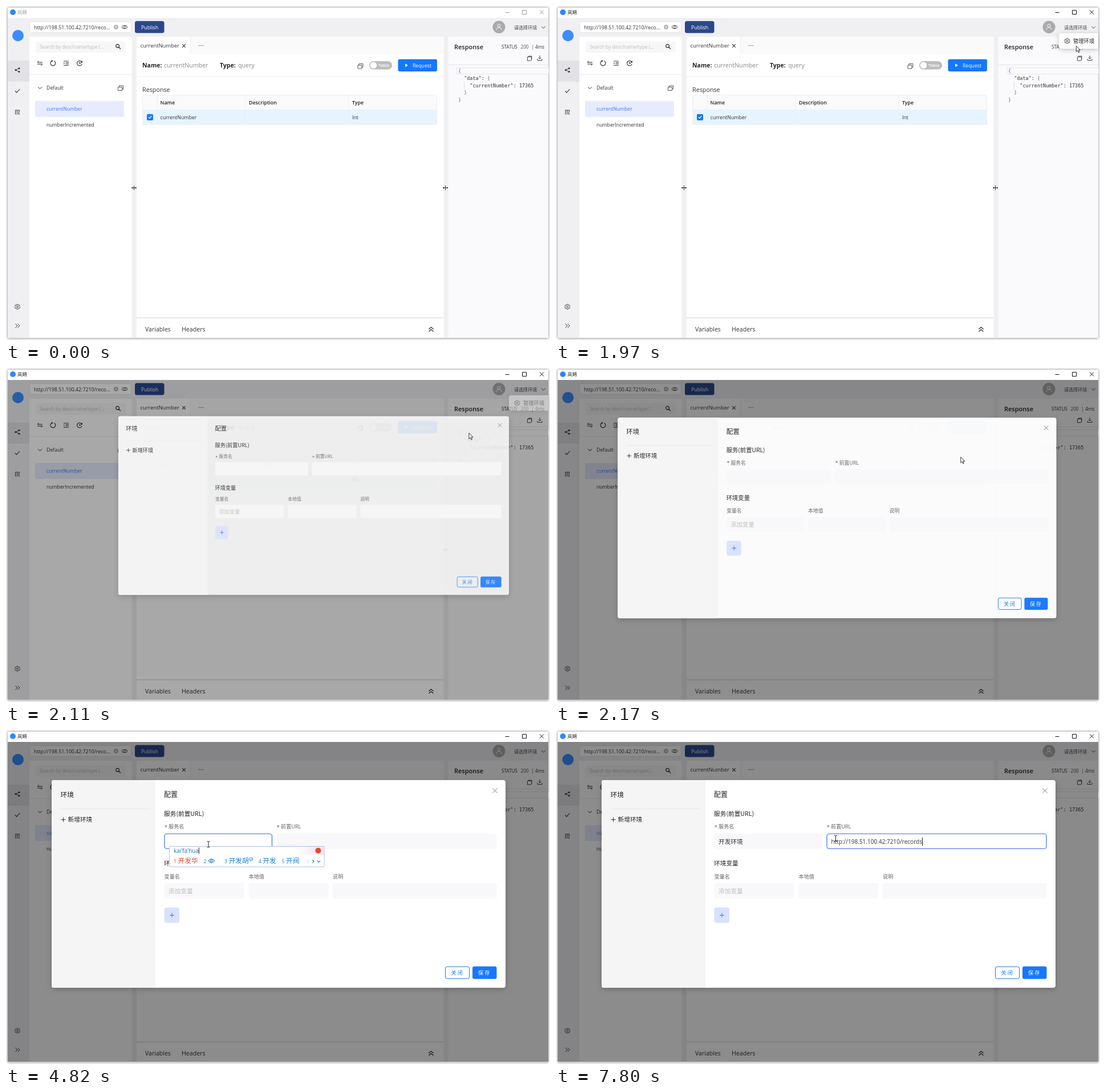
Write an HTML page with a canvas that moves like this. It is 954x587 px and loops after 8000 ms.

```html
<!DOCTYPE html>
<html lang="zh">
<head>
<meta charset="utf-8">
<title>API client</title>
<style>
html, body { margin: 0; width: 100%; height: 100%; overflow: hidden; background: #fff; }
canvas { display: block; width: 954px; height: 587px; }
</style>
</head>
<body>
<canvas id="stage"></canvas>
<script>
const W = 954, H = 587, LOOP = 8000, STEP = 68.4;
const canvas = document.getElementById('stage');
const ctx = canvas.getContext('2d');
const dpr = window.devicePixelRatio || 1;
canvas.width = W * dpr;
canvas.height = H * dpr;

const SANS = '"Open Sans", "Noto Sans CJK SC", sans-serif';
const HAN = '"Noto Sans CJK SC", "Noto Sans CJK JP", "Noto Sans CJK", sans-serif';
const MONO = '"DejaVu Sans Mono", monospace';
const BLUE = '#1677ff', INK = '#333', BAR = '#f0f0f3';
const ADDRESS = 'http://198.51.100.42:7210/records';

// ---------- helpers ----------
function text(s, x, y, size, color = INK, weight = 400, family = SANS) {
  ctx.font = `${weight} ${size}px ${family}`;
  ctx.fillStyle = color;
  ctx.fillText(s, x, y);
  return ctx.measureText(s).width;
}
// Chinese text, placed by its vertical centre
const han = (s, x, cy, size, color = INK, weight = 400) =>
  text(s, x, cy + size * 0.37, size, color, weight, HAN);

function rect(x, y, w, h, color, r = 0) {
  ctx.fillStyle = color;
  ctx.beginPath();
  ctx.roundRect(x, y, w, h, r);
  ctx.fill();
}
function frame(x, y, w, h, color, r = 0, line = 1) {
  ctx.strokeStyle = color;
  ctx.lineWidth = line;
  ctx.beginPath();
  ctx.roundRect(x + 0.5, y + 0.5, w - 1, h - 1, r);
  ctx.stroke();
}
function disc(x, y, r, color) {
  ctx.fillStyle = color;
  ctx.beginPath();
  ctx.arc(x, y, r, 0, 7);
  ctx.fill();
}
function icon(x, y, d, color = INK, line = 1, fill) {
  ctx.save();
  ctx.translate(x, y);
  const p = new Path2D(d);
  if (fill) { ctx.fillStyle = fill; ctx.fill(p); }
  ctx.strokeStyle = color;
  ctx.lineWidth = line;
  ctx.stroke(p);
  ctx.restore();
}
const ring = r => `M${r} 0A${r} ${r} 0 1 1 ${-r} 0A${r} ${r} 0 1 1 ${r} 0`;
function shadow(color, blur, dy = 0) {
  ctx.shadowColor = color;
  ctx.shadowBlur = blur * dpr;
  ctx.shadowOffsetY = dy * dpr;
}
const noShadow = () => shadow('transparent', 0);

// Values at time t from rows of [time, ...values]
function along(keys, t) {
  if (t <= keys[0][0]) return keys[0].slice(1);
  for (let i = 1; i < keys.length; i++) {
    const a = keys[i - 1], b = keys[i];
    if (t < b[0]) {
      const p = (t - a[0]) / (b[0] - a[0]);
      return a.slice(1).map((v, j) => v + (b[j + 1] - v) * p);
    }
  }
  return keys[keys.length - 1].slice(1);
}

const CROSS = 'M-3.5-3.5L3.5 3.5M3.5-3.5L-3.5 3.5';
const COPY = 'M-4.5-1.5H2.5V4.5H-4.5ZM-2.5-1.5V-4H4.5V2H2.5';
const GEAR = ring(1.5) + 'M-1.2-4.2H1.2L1.8-2.9L3.6-2.9L4.4-.9L3.5 0L4.4.9L3.6 2.9L1.8 2.9L1.2 4.2H-1.2L-1.8 2.9L-3.6 2.9L-4.4.9L-3.5 0L-4.4-.9L-3.6-2.9L-1.8-2.9Z';
const PLUS = 'M-4 0H4M0-4V4';
const DOWN = 'M-3.3-1.7L0 1.7L3.3-1.7';

// ---------- main window ----------
function titleBar(active) {
  const c = active ? '#111' : '#999';
  rect(3, 3, 948, 18, '#fff');
  disc(12, 11, 5, '#2f86ff');
  han('岚朔', 20, 11, 8.3, c);
  icon(879, 11, 'M-3.5.5H3.5', c);
  icon(909, 11, 'M-3.5-3.5H3.5V3.5H-3.5Z', c);
  icon(939.5, 11, CROSS, c);
}

function topBar() {
  rect(41, 27, 179, 20, '#fff', 4);
  frame(41, 27, 179, 20, '#e2e2e6', 4);
  text(ADDRESS.slice(0, 30) + '...', 49, 40.5, 8.8);
  disc(193, 37, 4, '#b5b5b5');
  icon(193, 37, 'M-1.5-1.5L1.5 1.5M1.5-1.5L-1.5 1.5', '#fff', 0.9);
  icon(208, 37, 'M1.5 2.5H-2.2A2.5 2.5 0 0 1-2.2-2.5H1A2.5 2.5 0 0 1 1 1.5H-1.5M-1.5-2.5H2.2A2.5 2.5 0 0 1 2.2 2.5H-1A2.5 2.5 0 0 1-1-1.5H1.5', '#444', 0.8);
  rect(226, 26.5, 51.5, 21, '#2b478b', 3.5);
  text('Publish', 237, 40.5, 8.8, '#fff');
  disc(864.5, 37, 11, '#aaa');
  icon(864.5, 37, 'M2.6-2.4A2.6 2.6 0 1 1-2.6-2.4A2.6 2.6 0 1 1 2.6-2.4M-4.8 5.2C-4.5-.8 4.5-.8 4.8 5.2', '#fff');
  han('请选择环境', 891, 38, 8.05, '#444');
  icon(942.5, 37.5, DOWN, '#444');
}

function rail() {
  rect(3, 96, 38, 37, '#e1e1e6');
  disc(21, 52, 10, '#3b8cff');
  icon(20, 112.5, 'M3-3L-3 0L3 3', INK, 0.9);
  [[-3, 0], [3, -3], [3, 3]].forEach(([x, y]) => disc(20 + x, 112.5 + y, 1.5, INK));
  icon(20, 149, 'M-4 .5L-1.3 3.2L4.2-3', INK, 1.1);
  icon(20, 186.5, 'M-1 3.5H-3.5V-3.5H3.5V0M-2-1.5H2M-2 .5H-.5M3 2A1.5 1.5 0 1 1 0 2A1.5 1.5 0 1 1 3 2M2.6 3L4 4.4', INK, 0.9);
  icon(20, 528.5, GEAR, INK, 0.9);
  icon(20, 562, 'M-3.5-3.5L0 0L-3.5 3.5M.5-3.5L4 0L.5 3.5', INK);
}

function sidePanel() {
  rect(41, 54, 179.5, 529, '#fff');
  rect(52, 62, 158, 20, '#f7f7f8', 3);
  text('Search by desc/name/type (...', 59, 75, 8.25, '#bdbdbd');
  icon(196.5, 71, 'M2 -.8A2.9 2.9 0 1 1-3.8-.8A2.9 2.9 0 1 1 2-.8M1.3 1.4L4.5 4.5', '#222', 1.2);
  icon(59.5, 100.5, 'M4.5-1.5H-4.5L-1.8-4M-4.5 1.5H4.5L1.8 4', '#222');
  icon(82.5, 100.5, 'M-1.2-4.3A4.4 4.4 0 1 0 1.8-4M-2.8-5L-1-4.2L-2-2.5', '#222', 1.1);
  icon(105.5, 100.5, 'M-4.5-3.5H4.5M-1-1H4.5M-1 1.3H4.5M-4.5 3.8H4.5M-4.5-1.2L-2.8.2L-4.5 1.6', '#222', 0.9);
  icon(129, 100.5, 'M3.8-2.2A4.4 4.4 0 1 0 4.2 1.6M0-2.5V.5H2.5M4.4-4V-1.6H2', '#222', 1.1);
  rect(41, 120, 179.5, 1, '#ececee');
  icon(59.5, 144, DOWN, '#222');
  text('Default', 71, 147, 8.8);
  icon(201, 144, COPY, '#444', 0.9);
  rect(51, 167, 156, 28, '#e6ebfe', 2);
  text('currentNumber', 71, 184, 8.6, '#3d78f2');
  text('numberIncremented', 71, 212, 8.65);
}

function centre() {
  rect(229, 54, 538.5, 529, '#fff');
  rect(229, 54, 538.5, 30.5, '#fafafb');
  rect(229, 54, 94, 31, '#fff');
  rect(323, 54, 1, 30, '#eeeef0');
  text('currentNumber', 235.5, 73, 9.4);
  icon(312, 70, 'M-2.8-2.8L2.8 2.8M2.8-2.8L-2.8 2.8', '#333', 1.1);
  [338.5, 342, 345.5].forEach(x => disc(x, 69.5, 0.8, '#555'));

  text('Name:', 239, 108, 10.5, '#222', 700);
  text('currentNumber', 277, 108, 10.65, '#888');
  text('Type:', 375, 108, 10.5, '#222', 700);
  text('query', 407, 108, 10.7, '#888');
  icon(621.5, 105.5, COPY, '#444', 0.9);
  rect(637, 97, 40, 14.5, '#bcbcbc', 7.2);
  disc(644.5, 104.2, 5.8, '#fff');
  text('Table', 653, 107, 7.6, '#fff', 600);
  rect(687.5, 93.5, 68.5, 21.5, BLUE, 3);
  icon(701, 104.2, 'M-.8-3L4-0L-.8 3Z', 'transparent', 0, '#fff');
  text('Request', 713, 107.5, 8.7, '#fff');
  rect(229, 123, 538, 1, '#f0f0f0');

  text('Response', 239, 150.5, 10.75);
  rect(239, 156.5, 517, 26, '#fafafa', [4, 4, 0, 0]);
  rect(239, 182, 517, 26.5, '#e6f4ff');
  frame(239, 156, 517, 53, '#efeff0', 3);
  [265, 419, 600].forEach(x => rect(x, 157, 1, 25, '#efeff0'));
  [265, 419, 600].forEach(x => rect(x, 182, 1, 26, '#e2f0fb'));
  rect(239, 182, 517, 1, '#eef1f4');
  text('Name', 270.5, 173, 8.8, '#222', 600);
  text('Description', 426, 173, 8.8, '#222', 600);
  text('Type', 607, 173, 8.8, '#222', 600);
  rect(247, 190, 11, 11, BLUE, 2);
  icon(252.5, 195.3, 'M-2.6 0L-.7 2L2.8-2.2', '#fff', 1.3);
  text('currentNumber', 270.5, 199, 8.75);
  text('Int', 607, 199, 8.75);

  rect(229, 547.5, 538, 1, '#cfcfd2');
  text('Variables', 244, 572, 10.55);
  text('Headers', 308, 572, 10.65);
  icon(745.5, 568, 'M-4 0L0-3.5L4 0M-4 4L0 .5L4 4', '#222', 1.1);
}

function responsePanel() {
  rect(775.5, 54, 175.5, 529, '#fafafc');
  text('Response', 786, 76, 11, '#222', 600);
  text('STATUS', 869, 75, 8.1);
  text('200', 902.5, 75, 8.2, '#555');
  text('|', 921, 75, 8.2, '#555');
  text('4ms', 928, 75, 8.1);
  icon(918, 92, 'M-3.5-2.5V4H2.5L3.5 3V-2.5ZM-1.5-2.5V-4H3.8V2', '#333', 0.9);
  icon(936, 91.5, 'M0-4.5V1.5M-2.5-1L0 1.5L2.5-1M-4 1.5V4H4V1.5', '#333', 0.9);
  rect(775.5, 103, 175.5, 1, '#e6e6e9');
  frame(790, 108, 162, 12, '#e6e6ea');
  rect(803, 133, 1, 13, '#ddd');
  const code = (s, col, row, color) => text(s, 793 + col * 5.09, 117.3 + row * 12.6, 8.46, color, 400, MONO);
  code('{', 0, 0, '#2a7fd4');
  code('"data":', 2, 1, '#333');
  code('{', 10, 1, '#777');
  code('"currentNumber": 17365', 4, 2, '#333');
  code('}', 2, 3, '#777');
  code('}', 0, 4, '#2a7fd4');
}

function splitter(x) {
  icon(x, 319.5, 'M-4 0H4M0-4V4M-2.6-1.5L-4 0L-2.6 1.5M2.6-1.5L4 0L2.6 1.5', '#333');
}

function mainWindow(active) {
  rect(0, 0, W, H, '#fff');
  shadow('rgba(0,0,0,.55)', 4);
  rect(3, 3, 948, 580.5, '#fff');
  noShadow();
  rect(3, 21, 948, 562, BAR);
  titleBar(active);
  topBar();
  rail();
  sidePanel();
  centre();
  responsePanel();
  splitter(224.5);
  splitter(770.5);
}

// ---------- pop-ups ----------
function envMenu(alpha) {
  ctx.globalAlpha = alpha;
  shadow('rgba(0,0,0,.22)', 8, 2);
  rect(882, 48, 69, 27, '#fff', [4, 0, 0, 4]);
  noShadow();
  icon(896.5, 61.5, GEAR, '#222', 0.9);
  han('管理环境', 907, 61.5, 9.3, '#222');
  ctx.globalAlpha = 1;
}

const FOCUS_NAME = 2870, COMMIT = 5440, FOCUS_URL = 6870, PASTE = 7800;
const blinkOn = (t, from) => Math.floor((t - from) / 530) % 2 === 0;

function field(x, y, w, focused) {
  rect(x, y, w, 27, focused ? '#fff' : '#f8f8fa', 4);
  if (focused) frame(x, y, w, 27, '#3d6ef0', 4, 1.2);
}
function caret(x) { rect(x, 189, 1, 14.5, '#222'); }

function required(label, x) {
  text('*', x, 174, 8.5, '#555');
  han(label, x + 7, 170, 9.15, '#666');
}

function dialog(t) {
  shadow('rgba(0,0,0,.2)', 10, 3);
  rect(80, 88, 796, 365, '#fff', 4);
  noShadow();
  rect(80, 88, 182, 365, '#f5f5f6', [4, 0, 0, 4]);
  han('环境', 95.5, 113.5, 11.8, '#222', 500);
  rect(96, 138, 157, 1, '#e8e8ea');
  icon(100.5, 157.5, PLUS, '#333');
  han('新增环境', 108.5, 157.5, 10.7, '#222');
  han('配置', 277, 113.5, 12, '#222', 500);
  icon(857.5, 106.5, 'M-4-4L4 4M4-4L-4 4', '#777');

  han('服务(前置URL)', 277, 147, 10.7, '#222', 500);
  required('服务名', 278);
  required('前置URL', 475);
  const onUrl = t >= FOCUS_URL, onName = t >= FOCUS_NAME && !onUrl;
  field(277.5, 182, 189.5, onName);
  field(474.5, 182, 386, onUrl);
  if (t >= COMMIT) han('开发环境', 285, 196, 10.7);
  const pasted = t >= PASTE;
  const urlWidth = pasted ? text(ADDRESS, 482.5, 199.8, 10.05) : 0;
  if (onName && blinkOn(t, t < COMMIT ? FOCUS_NAME : COMMIT)) caret(t < COMMIT ? 285 : 328);
  if (onUrl && blinkOn(t, pasted ? PASTE : FOCUS_URL)) caret(482.5 + urlWidth);

  han('环境变量', 277, 234, 10.7, '#222', 500);
  [['变量名', 277.5, 140], ['本地值', 425.5, 140], ['说明', 573, 287.5]].forEach(([s, x, w]) => {
    han(s, x, 257.5, 9.15, '#666');
    field(x, 269, w);
  });
  han('添加变量', 285, 283, 10.7, '#bfbfbf');
  rect(277.5, 312, 26.5, 27, '#d9e2fd', 4);
  icon(291, 325.5, PLUS, '#3d6ef0');

  frame(770, 415.5, 43, 22, BLUE, 3);
  han('关 闭', 780.5, 426.5, 9.2, BLUE);
  rect(818, 415.5, 42.5, 22, BLUE, 3);
  han('保 存', 828, 426.5, 9.2, '#fff', 500);
}

// ---------- input method ----------
const TYPED = [
  [3610, 'k', '看 可 开 快 客户'],
  [3680, 'ka', '卡 咖 喀 咔 卡片'],
  [3745, 'kai', '开 凯 楷 慨 开始'],
  [3950, "kai'f", '开发 开放 开方 开房 开封'],
  [4015, "kai'fa", '开发 开罚 开法 开阀 开伐'],
  [4480, "kai'fa'h", '开发好 开发和 开发后 开发 开阀'],
  [4680, "kai'fa'hu", '开发户 开发湖 开发胡 开发 开阀'],
  [4820, "kai'fa'hua", '开发华 @ 开发胡+ 开发 开阀'],
  [4890, "kai'fa'huan", '开发环 开发换 开发欢 开发 开阀'],
  [4960, "kai'fa'huan'j", '开发环境 开发环节 开发环 开发 开阀'],
  [5030, "kai'fa'huan'ji", '开发环境 开发环节 开发环 开发 开阀'],
  [5100, "kai'fa'huan'jing", '开发环境 开发幻境 开发环 开发 开阀']
];

// One candidate: '@' is an eye sign, a trailing '+' adds a badge. Returns the next x.
function candidate(s, i, x, draw) {
  const c = i ? '#1480d8' : '#e8432e', size = 11.7;
  const word = s.replace('+', '');
  if (draw) text(i + 1, x, 233.5, 8.6, c);
  x += 7.5;
  if (s === '@') {
    if (draw) icon(x + 6, 230, 'M-5.5 0Q0-6.5 5.5 0Q0 6.5-5.5 0' + ring(1.8), c, 1.1);
    return x + 29;
  }
  if (draw) han(word, x, 230, size, c);
  x += word.length * size;
  if (word !== s) {
    if (draw) icon(x + 4, 227, ring(3) + 'M-1.4 0L-.3 1.2L1.6-1.2', c, 0.9);
    x += 7;
  }
  return x + 10;
}

function imePopup(t) {
  if (t < TYPED[0][0] || t >= COMMIT) return;
  const [, pinyin, list] = TYPED.filter(row => row[0] <= t).pop();
  const words = list.split(' ');
  const layout = draw => words.reduce((x, s, i) => candidate(s, i, x, draw), 294);
  const right = layout(false) + 34;

  rect(286, 204, right - 286, 37, '#fff', 1);
  const glow = ctx.createLinearGradient(right - 50, 0, right - 12, 0);
  glow.addColorStop(0, 'rgba(240,225,245,0)');
  glow.addColorStop(1, 'rgba(244,222,236,.8)');
  rect(right - 50, 205, 49, 14, glow);
  frame(286, 204, right - 286, 37, '#aebff0', 1);
  disc(right - 11, 212, 5, '#e2492f');
  const w = text(pinyin, 294, 215.8, 9.9, '#1b6fc4');
  rect(294 + w, 206.5, 1, 11, '#222');
  layout(true);
  icon(right - 29, 231, 'M1.3-2.6L-1.3 0L1.3 2.6', '#ccd');
  icon(right - 20, 231, 'M-1.3-2.6L1.3 0L-1.3 2.6', '#1480d8', 1.2);
  icon(right - 10, 231, 'M-2.6-1.3L0 1.3L2.6-1.3', '#1480d8', 1.2);
}

// ---------- pointer ----------
const PATH = [
  [130, 944, 573], [330, 920, 455], [550, 876, 250], [740, 842, 115], [880, 835, 83],
  [940, 838, 79], [1260, 912, 39], [1400, 914, 39], [1700, 919, 65], [1895, 919, 65],
  [1963, 912, 70], [2032, 892, 79], [2100, 812, 114], [2169, 709, 156.5],
  [2300, 545, 186], [2450, 420, 196], [2590, 366, 200], [2720, 355, 201],
  [5970, 355, 201], [6110, 363, 195], [6300, 363, 195], [6500, 425, 192],
  [6700, 484, 190.5], [6800, 490.5, 190.5]
];
const ZOOM = [
  [1963, 0.2, 0, 0], [2032, 0.537, 0.45, 0.13], [2100, 0.86, 0.85, 0.34],
  [2169, 0.9665, 0.97, 0.44], [2237, 1, 1, 0.45]
];

function pointer(t, mt) {
  if (t < 130) return;
  const [x, y] = along(PATH, mt);
  const overField = t > 2240 && y > 182 && y < 209 && ((x > 277 && x < 467) || (x > 475 && x < 860));
  ctx.save();
  ctx.beginPath();
  ctx.rect(3, 3, 948, 580);
  ctx.clip();
  if (overField) icon(x, y, 'M-2.5-5H-.6L0-4.5L.6-5H2.5M0-4.5V4.5M-2.5 5H-.6L0 4.5L.6 5H2.5', '#222');
  else icon(x, y, 'M.5 0V10.2L2.8 8.1L4.4 11.8L6.1 11L4.5 7.4H7.6Z', '#222', 0.9, '#fff');
  ctx.restore();
}

// ---------- loop ----------
const CLICK_ENV = 1330;

function draw(t) {
  const mt = Math.floor((t + 20) / STEP) * STEP - 20;
  const [scale, alpha, dim] = along(ZOOM, mt);
  ctx.setTransform(dpr, 0, 0, dpr, 0, 0);
  mainWindow(t >= CLICK_ENV);
  if (dim > 0) rect(3, 21, 948, 562, `rgba(0,0,0,${dim})`);
  if (alpha > 0) {
    ctx.save();
    ctx.globalAlpha = alpha;
    ctx.translate(919, 64.3);
    ctx.scale(scale, scale);
    ctx.translate(-919, -64.3);
    dialog(t);
    ctx.restore();
  }
  const menu = along([[CLICK_ENV, 0], [1480, 1], [2040, 1], [2150, 0]], mt)[0];
  if (menu > 0) envMenu(menu);
  imePopup(t);
  pointer(t, mt);
}

const start = performance.now();
function tick() {
  draw((performance.now() - start) % LOOP);
  requestAnimationFrame(tick);
}
tick();
</script>
</body>
</html>
```
